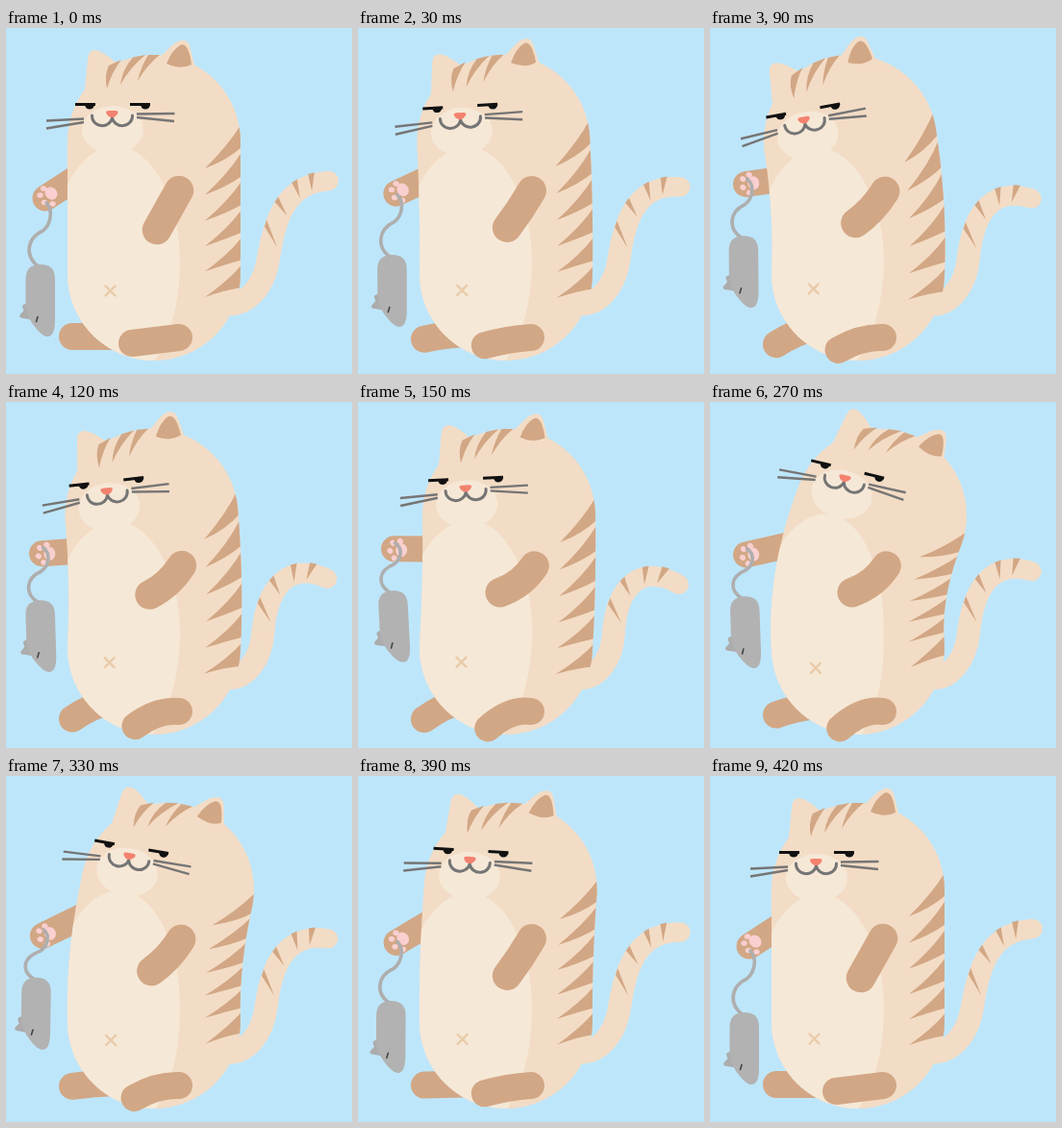
These frames come from a looping animation (360x360 px, 0.45 s). An HTML page with a canvas:

```html
<!DOCTYPE html>
<html lang="en">
<head>
<meta charset="utf-8">
<title>Dancing cat</title>
<style>
  html, body { margin: 0; width: 100%; height: 100%; overflow: hidden; background: #bee6fa; }
  canvas { display: block; width: 360px; height: 360px; }
</style>
</head>
<body>
<canvas id="stage" width="360" height="360"></canvas>
<script>
const ctx = document.getElementById('stage').getContext('2d');
const SKY = '#bee6fa', FUR = '#f3dcc5', CREAM = '#f6e8d7', BROWN = '#d2a785';
const PINK = '#f9cfd0', GREY = '#b2b2b2', LINE = '#757575';
const STEP = 30, LAST = 14, TAU = Math.PI * 2;
const TIMES = [0, 3, 5, 7, 9, 11, 14];
let k = 0;

const mix = (a, b, p) => a + (b - a) * p;
const mixPt = (a, b, p) => [mix(a[0], b[0], p), mix(a[1], b[1], p)];
const rad = d => d * Math.PI / 180;

// Linear track through TIMES that closes on its first value
function track(...v) {
  let i = 0;
  while (i < 5 && k > TIMES[i + 1]) i++;
  return mix(v[i], v[(i + 1) % 6], (k - TIMES[i]) / (TIMES[i + 1] - TIMES[i]));
}
// Straight rise to 1 at the peak step, straight fall back
const swing = peak => k < peak ? k / peak : (LAST - k) / (LAST - peak);

function fill(d, color) {
  ctx.fillStyle = color;
  ctx.fill(d instanceof Path2D ? d : new Path2D(d));
}
function stroke(d, color, width) {
  ctx.strokeStyle = color;
  ctx.lineWidth = width;
  ctx.stroke(new Path2D(d));
}
function oval(x, y, rx, ry, color, turn = 0) {
  ctx.beginPath();
  ctx.ellipse(x, y, rx, ry, turn, 0, TAU);
  ctx.fillStyle = color;
  ctx.fill();
}
const poly = pts => new Path2D('M' + pts.join('L') + 'Z');
const limb = (a, c, b, w) => stroke(`M${a}Q${c} ${b}`, BROWN, w);

// Draws with rest coordinates, moved from pivot to spot and turned
function posed(pivot, spot, deg, draw) {
  ctx.save();
  ctx.translate(...spot);
  ctx.rotate(rad(deg));
  ctx.translate(-pivot[0], -pivot[1]);
  draw();
  ctx.restore();
}

// Rest outline of the body: an upright pill
const outline = [];
for (let i = 0; i <= 40; i++) {
  const a = Math.PI * (1 + i / 40);
  outline.push([154 + 90 * Math.cos(a), 118 + 90 * Math.sin(a)]);
}
for (let i = 1; i < 16; i++) outline.push([244, 118 + 138 * i / 16]);
for (let i = 0; i <= 40; i++) {
  const a = Math.PI * i / 40;
  outline.push([154 + 90 * Math.cos(a), 256 + 90 * Math.sin(a)]);
}
for (let i = 1; i < 16; i++) outline.push([64, 256 - 138 * i / 16]);

// Bends a rest point along the spine
function spine(headX, midX) {
  return ([x, y]) => {
    const u = (256 - y) / 138, t = Math.min(1, Math.max(0, u)), s = 1 - t;
    const px = s * s * 154 + 2 * s * t * midX + t * t * headX;
    const py = s * s * 256 + 2 * s * t * 190 + t * t * 118;
    const dx = 2 * s * (midX - 154) + 2 * t * (headX - midX);
    const dy = -132 * s - 144 * t;
    const len = Math.hypot(dx, dy), tx = dx / len, ty = dy / len;
    const side = x - 154, over = (u - t) * 138;
    return [px - ty * side + tx * over, py + tx * side + ty * over];
  };
}

function tail() {
  const p = swing(5);
  const pts = [
    mixPt([273, 240], [266, 240], p), mixPt([281, 190], [268, 198], p),
    mixPt([295, 162], [291, 165], p), mixPt([336, 159], [334, 190], p)
  ];
  const [a, b, c, d] = pts;
  const root = [a[0] - .6 * (b[0] - a[0]), a[1] - .6 * (b[1] - a[1])];
  stroke(`M228 287C250 290 ${root} ${a}`, FUR, 24);
  stroke(`M${a}C${b} ${c} ${d}`, FUR, 20);

  const at = (t, n) => {
    const s = 1 - t;
    const pos = i => s ** 3 * a[i] + 3 * s * s * t * b[i] + 3 * s * t * t * c[i] + t ** 3 * d[i];
    const vel = i => s * s * (b[i] - a[i]) + 2 * s * t * (c[i] - b[i]) + t * t * (d[i] - c[i]);
    const len = Math.hypot(vel(0), vel(1));
    return [pos(0) - vel(1) / len * n, pos(1) + vel(0) / len * n];
  };
  // Taper towards the tip
  const edge = [];
  for (let i = 0; i <= 20; i++) {
    const t = i / 20, r = 12 - 2 * t;
    edge.push(at(t, r));
    edge.unshift(at(t, -r));
  }
  fill(poly(edge), FUR);
  for (const t of [.25, .47, .7, .86]) {
    fill(poly([at(t - .025, -11), at(t + .03, -11), at(t - .04 / t, 7)]), BROWN);
  }
}

function backLimbs(hand) {
  const q = track(0, .9, 1, .8, .5, .2);
  limb([69, 321 + 9 * q], [90, 321 - 6 * q], [110 - 4 * q, 321 - 9 * q], 28);

  const shoulder = [90, track(145, 155, 153, 152, 147, 141)];
  limb(hand, mixPt(hand, shoulder, .5), shoulder, 27);
  posed([41, 177], hand, 60 * swing(6), () => {
    oval(47, 172, 7, 6, PINK, .8);
    for (const [x, y] of [[39, 167], [35.5, 174], [40, 181.5], [48.5, 183]]) oval(x, y, 3.2, 2.8, PINK);
  });
}

function mouse(hand) {
  const slack = k < 5 ? k / 5 : k > 11 ? (LAST - k) / 3 : 1;
  const top = [track(35, 34, 35, 37, 35, 31), hand[1] + mix(69, 43.5, slack)];
  const end = [hand[0] + 1, hand[1] + mix(5, -6, Math.min(1, slack * 1.6))];
  const h = top[1] - end[1], mid = (top[0] + end[0]) / 2;
  const y = f => top[1] - f * h;
  stroke(`M${top[0]} ${top[1] + 3}C${top[0] - 16} ${y(.12)} ${top[0] - 14} ${y(.42)} ${mid} ${y(.55)}` +
    `C${mid + 8} ${y(.65)} ${mid + 11} ${y(.88)} ${end}`, '#aeaeae', 3.6);
  posed([35, 246], top, track(0, -.5, -3, -4, -2, 1), () => {
    fill('M25 285L18 288Q16 289 18.500 294L14 299Q14 302 18 302L29 304Z', '#acacac');
    fill('M20.500 261Q20.500 246 36 246Q51 246 51 261L51 304Q51 321 43 321' +
      'Q37 321 27 307Q20.500 297 20.500 285Z', GREY);
    stroke('M33 300.500L31.500 305.500', '#444', 1.6);
  });
}

function body(warp) {
  const shape = poly(outline.map(warp));
  fill(shape, FUR);
  ctx.save();
  ctx.clip(shape);

  const soft = p => mixPt(p, warp(p), .45);
  const q = [[115, 123], [152, 123], [181, 180], [181, 240], [181, 292], [168, 330], [150, 352],
    [40, 352], [49, 300], [49, 236], [49, 175], [76, 123]].map(soft);
  fill(`M${q[0]}C${q[1]} ${q[2]} ${q[3]}C${q[4]} ${q[5]} ${q[6]}L${q[7]}L${q[8]}L${q[9]}C${q[10]} ${q[11]} ${q[0]}Z`, CREAM);

  for (let i = 0; i < 6; i++) {
    const tipY = 145 + 27 * i, baseY = 98 + 29.4 * i;
    const tip = warp([207, tipY]);
    const hi = warp([246, baseY]), lo = warp([246, baseY + 25]);
    const c1 = warp([232, mix(tipY, baseY, .5)]), c2 = warp([230, tipY - 8]);
    fill(`M${tip}Q${c1} ${hi}L${lo}Q${c2} ${tip}Z`, BROWN);
  }
  ctx.restore();

  const [x, y] = warp([108.5, 273.5]);
  stroke(`M${x - 5} ${y - 5}l10 10m0 -10l-10 10`, '#e9cbaa', 2.4);
}

function crown(headX) {
  posed([154, 118], [headX, 118], track(0, -11, -1, 7.3, 20, 13), () => {
    fill('M82 64L85 33Q86 20 97 24Q108 29 118 40Z', FUR);
    fill('M154 36L174 17Q188 7 191.500 20L198 46Z', FUR);
    fill('M167 37Q173 22 182 17.500Q190 15 193 38Q182 44 167 37Z', BROWN);
    fill('M105 63Q102 49 107 39L120 33Q110 46 105 63Z', BROWN);
    fill('M119 59Q121 43 132 30.500L145 28Q129 41 119 59Z', BROWN);
    fill('M137 55Q140 41 148 28L160 28Q147 38 137 55Z', BROWN);
  });
}

function face() {
  const nose = [track(110, 97.5, 111.5, 125, 140, 128), track(89, 95.5, 89.5, 84, 79, 83)];
  posed([110, 89], nose, track(0, -10.5, -2.5, 6.5, 13.5, 10), () => {
    oval(111, 106, 32, 25, CREAM);
    stroke('M89.500 91A10.600 10 0 0 0 110.500 93.500A10.600 10 0 0 0 131.500 91', LINE, 3);
    fill('M104 88Q104 86 107 86L114 86Q117 86 116.500 88.500Q114 93 110.500 93Q106 93 104 88Z', '#f3826f');
    ctx.lineCap = 'butt';
    stroke('M81 94.500L42 96.500M81 98L42 104.500M136 89.500L175.500 89M136 93L175 97', LINE, 2.4);
    stroke('M72 79.500H93M129 79.500H150', '#111', 3);
    ctx.lineCap = 'round';
    fill('M82 80H92Q91 84.500 87 84.500Q83 84.500 82 80ZM140 80H150Q149 84.500 145 84.500Q141 84.500 140 80Z', '#111');
  });
}

function frontLimbs() {
  const p = swing(7);
  limb(mixPt([180, 169], [185, 171], p), mixPt([168.5, 189.5], [171, 191], p),
    mixPt([157, 210], [144, 193.5], p), 30.5);
  limb([180, 322], mixPt([155, 325], [160, 316], p), mixPt([131, 328], [137, 344], p), 28);
}

function draw() {
  const headX = track(154, 146, 157, 168, 177, 168);
  const warp = spine(headX, track(154, 157, 158, 155, 149, 152));
  const lift = swing(6);
  const hand = [41 - 3.5 * Math.min(1, lift * 2), 177 - 29 * lift];
  ctx.lineCap = 'round';
  ctx.lineJoin = 'round';
  ctx.fillStyle = SKY;
  ctx.fillRect(0, 0, 360, 360);
  tail();
  backLimbs(hand);
  mouse(hand);
  body(warp);
  crown(headX);
  face();
  frontLimbs();
}

function tick() {
  k = Math.floor(performance.now() / STEP) % (LAST + 1);
  draw();
  requestAnimationFrame(tick);
}
tick();
</script>
</body>
</html>
```
